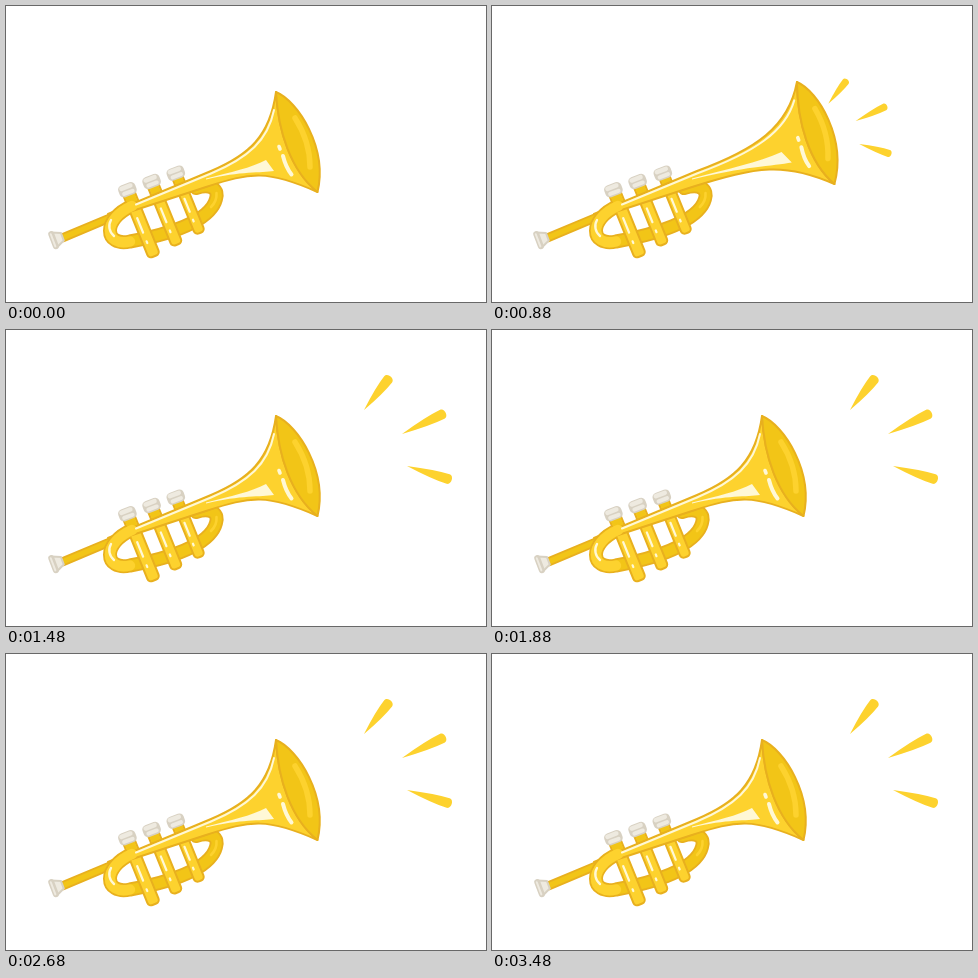
An HTML page with a canvas that plays this animation: 480x296 px, repeating every 3.6 s.

```html
<!DOCTYPE html>
<html lang="en">
<head>
<meta charset="utf-8">
<title>Trumpet</title>
<style>
html, body { margin: 0; width: 100%; height: 100%; overflow: hidden; background: #fff; }
canvas { display: block; width: 480px; height: 296px; }
</style>
</head>
<body>
<canvas id="c" width="480" height="296"></canvas>
<script>
const ctx = document.getElementById('c').getContext('2d');
const LOOP = 400, STEP = 40, MOVE = 280, PEAK = 100;
const YELLOW = '#fdd22e', GOLD = '#f2c517', EDGE = '#e8b01e', SHINE = '#fff8d6';
const GREY = '#d8d1c2', PALE = '#eeeae0';
const BELL = { x: 280.5, y: 143.5 };

const clamp = v => Math.max(0, Math.min(1, v));

let stretch = 0;

// The flared end slides forward, the rest stays put.
function bend(x, y) {
  const a = stretch * clamp((x - 205) / 60);
  return [x + a * (35 - 0.04 * (y - 86)), y + a * (0.02 * (y - 86) - 10)];
}

// Valves and crook follow only a little.
function nudge(x, y) {
  return [x + stretch * 3 * clamp((x - 150) / 58), y];
}

// Adds lines (2 numbers) or cubic curves (6 numbers) to a path.
function trace(map, x, y, ...parts) {
  const path = new Path2D();
  path.moveTo(...map(x, y));
  for (const p of parts) {
    const q = [];
    for (let i = 0; i < p.length; i += 2) q.push(...map(p[i], p[i + 1]));
    if (q.length === 2) path.lineTo(...q); else path.bezierCurveTo(...q);
  }
  return path;
}

function stroke(path, width, color) {
  ctx.lineWidth = width;
  ctx.strokeStyle = color;
  ctx.stroke(path);
}

function fill(path, color, edge) {
  ctx.fillStyle = color;
  ctx.fill(path);
  if (edge) stroke(path, 2, edge);
}

function tube(path, width, color) {
  stroke(path, width, EDGE);
  stroke(path, width - 3.6, color);
}

function box(x, y, w, h, r, color, edge) {
  const path = new Path2D();
  path.roundRect(x, y, w, h, r);
  fill(path, color, edge);
}

// Draws in a frame moved to a point and turned.
function at(x, y, angle, paint) {
  ctx.save();
  ctx.translate(x, y);
  ctx.rotate(angle);
  paint();
  ctx.restore();
}

function ray(x, y, ex, ey) {
  const len = Math.hypot(ex - x, ey - y), w = 5;
  at(x, y, Math.atan2(ey - y, ex - x), () => {
    const path = new Path2D();
    path.moveTo(0, 0);
    path.quadraticCurveTo(len * 0.6, -w, len - 3, -w);
    path.bezierCurveTo(len + 2, -w, len + 2, w, len - 3, w);
    path.quadraticCurveTo(len * 0.6, w, 0, 0);
    fill(path, YELLOW);
  });
}

function rays(scale) {
  if (scale <= 0) return;
  ctx.save();
  ctx.translate(BELL.x, BELL.y);
  ctx.scale(scale, scale);
  ctx.translate(-BELL.x, -BELL.y);
  ray(358, 80, 384, 47);
  ray(396, 104, 439, 83);
  ray(401, 136, 445, 150);
  ctx.restore();
}

function mouthpiece() {
  at(48 - stretch, 234, -0.36, () => {
    tube(trace((x, y) => [x, y], 9, 1, [61, -1]), 9, GOLD);
    const cone = new Path2D('M0-8 L9-4 V4 L0 8 Z');
    fill(cone, PALE, GREY);
    box(-3.5, -9.5, 6, 19, 3, GREY);
    box(-2, -7.5, 2, 15, 1, PALE);
  });
}

const crookLeft = () => trace(nudge, 126, 200, [96, 213, 98, 241, 124, 235.5]);

function crook() {
  tube(trace(nudge, 126, 200, [96, 213, 98, 241, 124, 235.5],
    [160, 229, 204, 216, 210, 193], [213, 184, 206, 177, 190, 182]), 14, GOLD);
  stroke(trace(nudge, 210.5, 187, [211, 193, 208, 198, 205, 201]), 2.6, YELLOW);
}

const valveTop = i => nudge(121.5 + 24.2 * i, 184 - 8.3 * i);

function valve(i) {
  const len = 71.5 - 3.6 * i, w = 12 - 0.8 * i;
  at(...valveTop(i), 1.185, () => {
    box(0, -w / 2, len, w, 4, YELLOW, EDGE);
    box(0, 1 - w / 2, 20, w - 2, 1, GOLD);
    box(len * 0.4, 0.5, len * 0.25, 2.2, 1, SHINE);
    box(len * 0.75, 0.5, 4, 2.2, 1, SHINE);
  });
}

function cap(i) {
  at(...valveTop(i), -0.36, () => {
    box(-9, -6.5, 18, 12.5, 4.5, GREY);
    box(-7.5, -5.5, 14, 4.5, 2.2, PALE);
    box(-6.5, 0.5, 13, 4, 2, PALE);
  });
}

function body() {
  const horn = trace(bend, 102, 208, [205, 165], [243, 149, 264, 130, 270, 86],
    [272, 125, 285, 165, 311.5, 186], [262, 164, 245, 166, 200, 181], [114, 209]);
  horn.closePath();
  fill(horn, YELLOW, EDGE);

  stroke(crookLeft(), 10.4, YELLOW);
  stroke(trace(nudge, 105, 214, [102, 219, 103, 226, 108, 230]), 2.4, SHINE);

  stroke(trace(bend, 130, 198.5, [205, 167.5], [243, 151.5, 262, 134, 268, 104]), 2, SHINE);
  fill(trace(bend, 200, 172.5, [225, 166, 245, 162, 260, 154], [268, 165],
    [255, 167, 235, 165, 200, 173.5]), SHINE);
  stroke(trace(bend, 277, 150, [279, 158, 282, 164, 285.5, 168.5]), 4, SHINE);
  stroke(trace(bend, 273, 140.5, [274, 143]), 3.6, SHINE);

  fill(trace(bend, 270, 86, [272, 125, 285, 165, 311.5, 186], [322, 142, 292, 95, 270, 86]), GOLD, EDGE);
  stroke(trace(bend, 289, 112, [298, 126, 304, 144, 304, 161]), 5.5, YELLOW);
}

function draw(now) {
  const phase = Math.min(Math.floor((now % LOOP) / STEP) * STEP, MOVE);
  stretch = 1.05 * (phase < PEAK
    ? Math.sin(Math.PI / 2 * phase / PEAK)
    : (1 + Math.cos(Math.PI * (phase - PEAK) / (MOVE - PEAK))) / 2);

  ctx.fillStyle = '#fff';
  ctx.fillRect(0, 0, 480, 296);
  ctx.lineCap = ctx.lineJoin = 'round';

  rays(1 - (1 - clamp(phase / 170)) ** 2);
  mouthpiece();
  crook();
  for (let i = 0; i < 3; i++) valve(i);
  body();
  for (let i = 0; i < 3; i++) cap(i);
}

const t0 = performance.now();
function tick() {
  draw(performance.now() - t0);
  requestAnimationFrame(tick);
}
tick();
</script>
</body>
</html>
```
